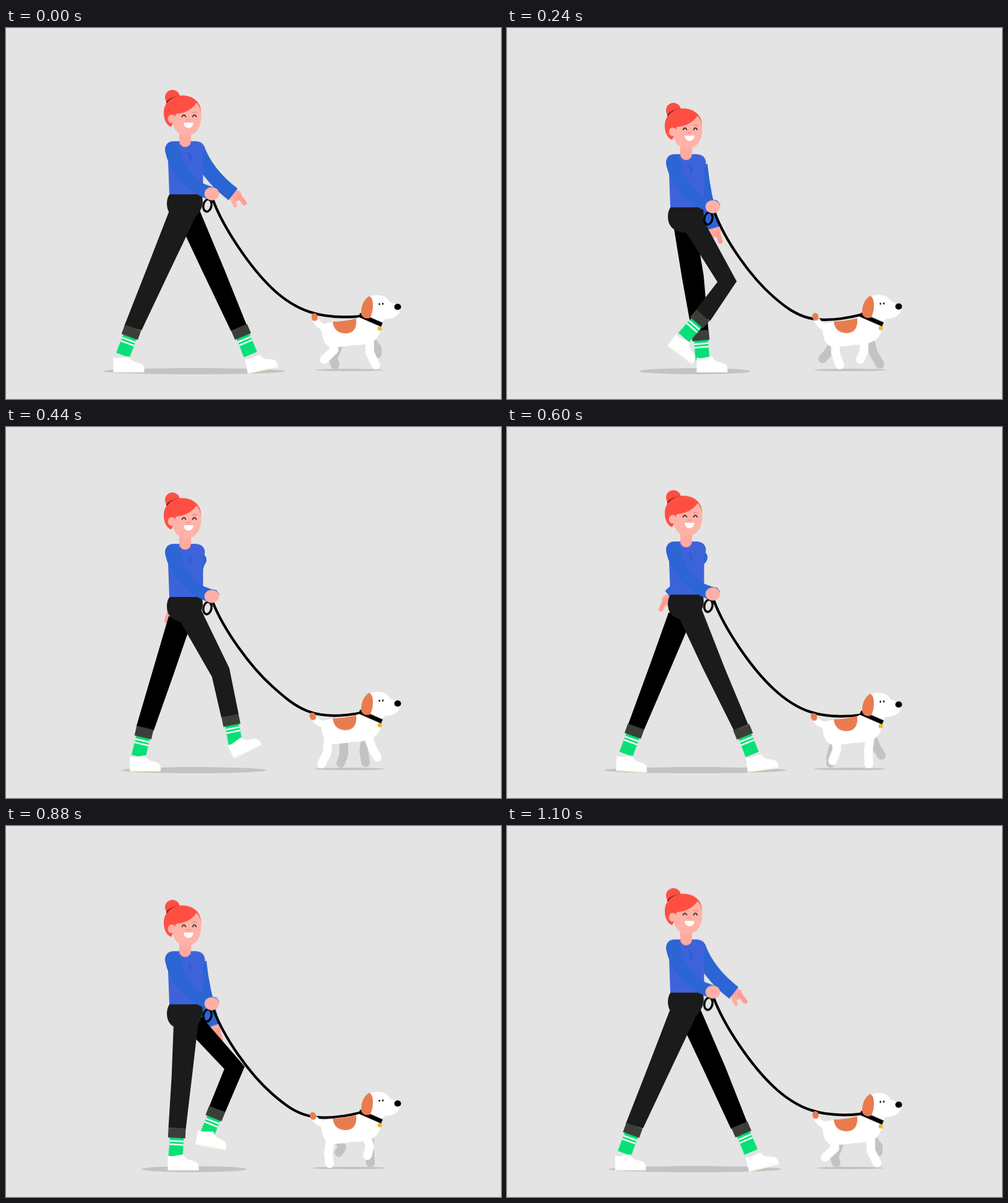
An HTML page without scripts for the animation above (1.12 s loop, 800 px wide and 600 px high).

```html
<!DOCTYPE html>
<html lang="en">
<head>
<meta charset="utf-8">
<title>Dog walk</title>
<style>
html, body { margin: 0; width: 100%; height: 100%; overflow: hidden; background: #e4e4e4; }
svg { display: block; width: 100%; height: 100%; }

/* one stride is 1120ms, one step 560ms, one dog bounce 280ms */
.stride { animation: 1120ms linear infinite; }
.step { animation: 560ms linear infinite; }
.bounce { animation: 280ms linear infinite; }
.off .stride { animation-delay: -560ms; }

.bob { animation-name: bob; }
.shade { animation-name: shade; }
.dogshade { animation-name: dogshade; }
.pants { animation-name: pants; }
.shin { animation-name: shin; }
.shoe { animation-name: shoe; }
.arm { animation-name: arm; }
.hand { animation-name: hand; }
.leash { animation-name: leash; }
.pup { animation-name: pup; }
.tail { animation-name: tail; }
.hind { animation-name: hind; }
.fore { animation-name: fore; }
.hind2 { animation-name: hind2; }
.fore2 { animation-name: fore2; }

.line { fill: none; stroke-linecap: round; stroke-linejoin: round; }
.paw { stroke-width: 14; }

@keyframes bob {
  0%, 100% { transform: translateY(0); }
  7.14% { transform: translateY(2px); }
  28.57% { transform: translateY(14px); }
  42.86% { transform: translateY(21px); }
  48.5% { transform: translateY(21.5px); }
  57.14% { transform: translateY(19.5px); }
  78.57% { transform: translateY(6px); }
  89% { transform: translateY(2px); }
  96.43% { transform: translateY(.5px); }
}
@keyframes shade {
  0%, 7.14%, 100% { transform: scaleX(1); }
  28.57% { transform: scaleX(.805); }
  42.86% { transform: scaleX(.61); }
  50% { transform: scaleX(.565); }
  57.14% { transform: scaleX(.574); }
  78.57% { transform: scaleX(.793); }
  96.43% { transform: scaleX(.943); }
}
@keyframes dogshade {
  0%, 28.57%, 96.43%, 100% { transform: scaleX(1); }
  7.14%, 42.86% { transform: scaleX(1.075); }
  57.14% { transform: scaleX(1.1); }
  78.57% { transform: scaleX(1.055); }
}
@keyframes pants {
  0%, 100% { d: path("M263 298L230 383 191 482 219 489 266 390 313 292z"); }
  3.57% { d: path("M261 300L233 378 195 482 221 490 264 390 305 295z"); }
  14.29% { d: path("M270 318L275 411 243 474 270 487 308 412 300 320z"); }
  21.43% { d: path("M285 324L340 411 304 457 328 474 371 410 316 308z"); }
  28.57% { d: path("M295 332L353 393 328 454 354 463 386 389 312 304z"); }
  39.29% { d: path("M279 310L333 404 348 470 376 465 361 390 316 297z"); }
  48.21% { d: path("M275 304L316 391 362 490 388 479 353 390 312 295z"); }
  53.57% { d: path("M278 308L317 391 367 491 390 481 352 390 314 293z"); }
  64.29% { d: path("M276 318L306 404 336 492 362 486 341 400 313 306z"); }
  71.43% { d: path("M270 325L283 404 299 491 326 489 318 400 306 330z"); }
  78.57% { d: path("M271 320L268 404 263 488 291 490 301 404 312 308z"); }
  89.29% { d: path("M263 306L237 395 211 484 239 491 271 400 301 312z"); animation-timing-function: ease-out; }
}
@keyframes shin {
  0%, 100% { transform: translate(205px, 485px) rotate(20deg); }
  3.57% { transform: translate(208px, 485px) rotate(20deg); }
  14.29% { transform: translate(257px, 480px) rotate(27deg); }
  21.43% { transform: translate(316px, 465px) rotate(41deg); }
  28.57% { transform: translate(341px, 458px) rotate(22deg); }
  39.29% { transform: translate(362px, 467px) rotate(-11deg); }
  48.21% { transform: translate(376px, 484px) rotate(-23deg); }
  53.57% { transform: translate(379px, 486px) rotate(-22deg); }
  64.29% { transform: translate(349px, 488px) rotate(-13deg); }
  71.43% { transform: translate(312.5px, 490px) rotate(-5deg); }
  78.57% { transform: translate(277px, 489px) rotate(3deg); }
  89.29% { transform: translate(225px, 487px) rotate(13deg); animation-timing-function: ease-out; }
}
@keyframes shoe {
  0%, 100% { transform: translate(186.5px, 532px) rotate(0); }
  3.57% { transform: translate(190px, 532px) rotate(3deg); }
  14.29% { transform: translate(240.5px, 518px) rotate(37deg); }
  21.43% { transform: translate(284px, 502px) rotate(37deg); }
  28.57% { transform: translate(323px, 493px) rotate(11deg); }
  39.29% { transform: translate(369px, 508px) rotate(-26deg); }
  48.21% { transform: translate(398px, 532px) rotate(-14deg); }
  53.57% { transform: translate(399px, 532px) rotate(-8deg); }
  64.29% { transform: translate(363.5px, 532px) rotate(0); }
  71.43% { transform: translate(320px, 532px) rotate(0); }
  78.57% { transform: translate(275px, 532px) rotate(0); }
  89.29% { transform: translate(213.5px, 532px) rotate(0); animation-timing-function: ease-out; }
}
@keyframes arm {
  0%, 100% { d: path("M309 195Q324 236 367 269"); animation-timing-function: ease-in; }
  21.43% { d: path("M312 200Q317 250 333 303"); }
  39.29% { d: path("M311 207Q300 250 273 282"); }
  53.57% { d: path("M311 207Q295 245 263 272"); }
  64.29% { d: path("M311 207Q305 250 280 288"); }
  78.57% { d: path("M312 200Q317 250 334 304"); animation-timing-function: ease-out; }
}
/* the hand turns over as it swings behind the body */
@keyframes hand {
  0%, 100% { transform: translate(367px, 267px) rotate(-43deg) scaleX(1); animation-timing-function: ease-in; }
  21.43% { transform: translate(334px, 303px) rotate(-22deg) scaleX(1); }
  39.29% { transform: translate(272px, 287px) rotate(25deg) scaleX(-1); }
  53.57% { transform: translate(263px, 273px) rotate(30deg) scaleX(-1); }
  64.29% { transform: translate(279px, 293px) rotate(25deg) scaleX(-1); }
  78.57% { transform: translate(335px, 304px) rotate(-22deg) scaleX(1); animation-timing-function: ease-out; }
}
@keyframes leash {
  0%, 100% { d: path("M334 277C352 325 396 389 431 422S506 473 575 466"); }
  28.57% { d: path("M335 291C352 336 394 396 431 429S496 481 575 463"); }
  42.86% { d: path("M335 297C352 343 393 402 431 435S496 483 575 463"); }
  57.14% { d: path("M335 296C352 342 393 401 431 434S496 483 575 463"); }
  78.57% { d: path("M334 283C352 328 394 387 431 420S496 478 575 462"); }
}
@keyframes pup {
  0%, 100% { transform: translateY(0); }
  14.29% { transform: translateY(-2.2px); }
  36% { transform: translateY(-4.2px); }
  57.14% { transform: translateY(-3.8px); }
  85.71% { transform: translateY(-.6px); }
}
@keyframes tail {
  0%, 100% { transform: rotate(0); }
  14.29% { transform: rotate(-12deg); }
  36% { transform: rotate(-18deg); }
  57.14% { transform: rotate(-14deg); }
  85.71% { transform: rotate(-1deg); }
}
@keyframes hind {
  0%, 96.43%, 100% { d: path("M528 508L530 521 514 536"); }
  7.14% { d: path("M532 508L533 522 526 540"); }
  28.57% { d: path("M534 508L537 525 542 546"); }
  42.86% { d: path("M531 508L531 526 538 545"); }
  57.14% { d: path("M524 508L521 528 523 546"); }
  78.57% { d: path("M520 508L519 526 510 545"); }
}
@keyframes fore {
  0%, 96.43%, 100% { d: path("M588 500L588 525 598 545"); }
  7.14% { d: path("M587 500L584 525 585 545"); }
  28.57% { d: path("M583 500L578 525 567 543"); }
  42.86% { d: path("M577 500L577 522 571 536"); }
  57.14% { d: path("M582 500L588 518 584 533"); }
  78.57% { d: path("M585 500L592 520 600 534"); }
}
@keyframes hind2 {
  0%, 96.43%, 100% { d: path("M537 515L529 534 532 545"); }
  7.14% { d: path("M528 515L523 535 523 544"); }
  28.57% { d: path("M528 512L520 528 508 543"); }
  42.86% { d: path("M525 515L518 526 510 535"); }
  57.14% { d: path("M540 512L543 520 538 528"); }
  78.57% { d: path("M546 512L546 530 541 544"); }
}
@keyframes fore2 {
  0%, 96.43%, 100% { d: path("M594 510L600 518 600 527"); }
  7.14% { d: path("M592 505L598 520 605 531"); }
  28.57% { d: path("M590 505L603 525 610 538"); }
  42.86% { d: path("M588 510L592 525 603 544"); }
  57.14% { d: path("M588 510L588 528 589 545"); }
  78.57% { d: path("M580 510L578 525 581 543"); }
}
</style>
</head>
<body>
<svg viewBox="0 0 800 600">
  <defs>
    <g id="sock">
      <path fill="#06e077" d="M-11 14H11.500V47H-11.500z"/>
      <path stroke="#fff" stroke-width="2.500" d="M-11 20.800H11.500M-11 26.300H11.500"/>
      <path fill="#3a3f38" d="M-14-.5H14V15.500H-14z"/>
    </g>
    <g id="sneaker">
      <path fill="#fff" d="M-13 1Q-6 3 0 1L12-1Q16 8 26 9 37 11 37 20V24H-13z"/>
      <path fill="#fafae6" d="M-13 22.500H37V25H-13z"/>
    </g>
  </defs>

  <g fill="#c3c3c3">
    <g transform="translate(304 555)"><ellipse class="step shade" rx="147" ry="5"/></g>
    <g transform="translate(554.5 553)"><ellipse class="step dogshade" rx="54.5" ry="2"/></g>
  </g>

  <!-- far arm -->
  <g class="step bob">
    <g class="stride hand line" stroke="#ff9d94" stroke-width="6.500">
      <ellipse cy="6" rx="10" ry="9" fill="#ffa59c" stroke="none"/>
      <path stroke="#ffaea5" d="M-7 5L-11 17"/>
      <path d="M4 10L2.500 24" stroke-width="7.500"/>
    </g>
    <path class="stride arm" fill="none" stroke="#2b64d3" stroke-width="24"/>
    <circle cx="312.500" cy="209" r="11.500" fill="#2b64d3"/>
  </g>

  <!-- legs -->
  <g class="off">
    <path class="stride pants" fill="#000"/>
    <g class="stride shin"><use href="#sock"/></g>
    <g class="stride shoe"><use href="#sneaker"/></g>
  </g>
  <g>
    <path class="stride pants" fill="#1b1b1b"/>
    <g class="stride shin"><use href="#sock"/></g>
    <g class="stride shoe"><use href="#sneaker"/></g>
  </g>

  <!-- body and head -->
  <g class="step bob">
    <path fill="#1b1b1b" d="M265 268H317L318 282Q316 299 302 309L285 310Q260 306 260 284 260 274 265 268z"/>
    <path fill="#3d63db" d="M271 183H307Q320 184 321.500 196 321 203 318.500 206V269H264L262 215Q257 201 257 195 259 183 271 183z"/>
    <path fill="#2b5fd0" d="M293 201Q301 203 300 211L295 217Q298 209 293 201z"/>
    <path fill="#ffaaa0" d="M280 168H299V183A9.500 9.500 0 0 1 280 183z"/>
    <circle cx="269" cy="112" r="12" fill="#ff4f42"/>
    <path class="line" stroke="#000" stroke-width="3" d="M260.500 120.500Q267 112.500 280 111"/>
    <path fill="#ffb2a8" d="M270 130L308 120Q315 127 315.500 137V146Q313 174 290 174 270 172 268 145z"/>
    <path fill="#ff4f42" d="M315 137C316 120 302 109 285 109 267 109 255 121 255 137 255 148 259 157 267 160L273 147 274 139Q297 137 308 121 314 127 315 137z"/>
    <ellipse cx="268" cy="147" rx="6.500" ry="7" fill="#ffb2a8"/>
    <g class="line" stroke-width="1.600">
      <path stroke="#1b1b1b" d="M284.500 143.500q3-6 6 0M301.500 143.500q3-6 6 0"/>
      <path stroke="#f27d70" stroke-width="1.200" d="M301.500 137q4-2.500 7 0M292 148.500h5.500"/>
    </g>
    <path fill="#fff" d="M287 153H303Q302 161.500 295 161.500 288 161.500 287 153z"/>
    <ellipse class="line" cx="325.500" cy="287" rx="6.500" ry="10" stroke="#000" stroke-width="3.500" transform="rotate(12 325.5 287)"/>
  </g>

  <path class="step leash line" stroke="#000" stroke-width="4.200"/>

  <!-- dog -->
  <g class="line paw" stroke="#c3c3c3">
    <path class="step hind2"/>
    <path class="step fore2"/>
  </g>
  <g class="line paw" stroke="#fff">
    <path class="step hind"/>
    <path class="step fore"/>
  </g>
  <g class="bounce pup">
    <g transform="translate(515 482)">
      <g class="bounce tail line">
        <path stroke="#fff" stroke-width="10" d="M6 3Q-8 3-14-9"/>
        <path stroke="#e87c4f" stroke-width="9.500" d="M-16-13L-16.500-16"/>
      </g>
    </g>
    <path fill="#fff" d="M512 479Q530 474 552 473 570 471 578 462L606 478Q608 492 598 503 587 513 560 513 542 517 525 516 514 513 511 497 510 487 506 484z"/>
    <path fill="#e87c4f" d="M528 475Q548 474.500 566 470 568 494 548 494 530 493 528 475z"/>
    <path fill="#fff" d="M582 440Q590 431 602 432 615 433 620 442 626 447 636 447 640 456 633 464 626 471 612 471L606 479 575 465z"/>
    <path stroke="#000" stroke-width="7" d="M571 464L607.500 480"/>
    <circle cx="604" cy="486" r="3.500" fill="#f7b52c"/>
    <path fill="#e87c4f" d="M586 434Q592 434 593 446 593.500 461 588 469 578 472 574 463 573 444 586 434z"/>
    <ellipse cx="633" cy="451" rx="5.500" ry="5"/>
    <ellipse cx="603.500" cy="446.500" rx="1.200" ry="1.800"/>
    <ellipse cx="609" cy="446" rx="1.200" ry="1.800"/>
  </g>

  <!-- near arm -->
  <g class="step bob">
    <path fill="#2c65d4" d="M257.500 195Q260 184 271 184 279 186 281 197 288 225 305 242 318 254 340 258L345 265 324 276Q300 267 278 243 262 222 257.500 200z"/>
    <ellipse cx="332.500" cy="268" rx="11.800" ry="10.500" fill="#ffb0a6"/>
  </g>
</svg>
</body>
</html>
```
